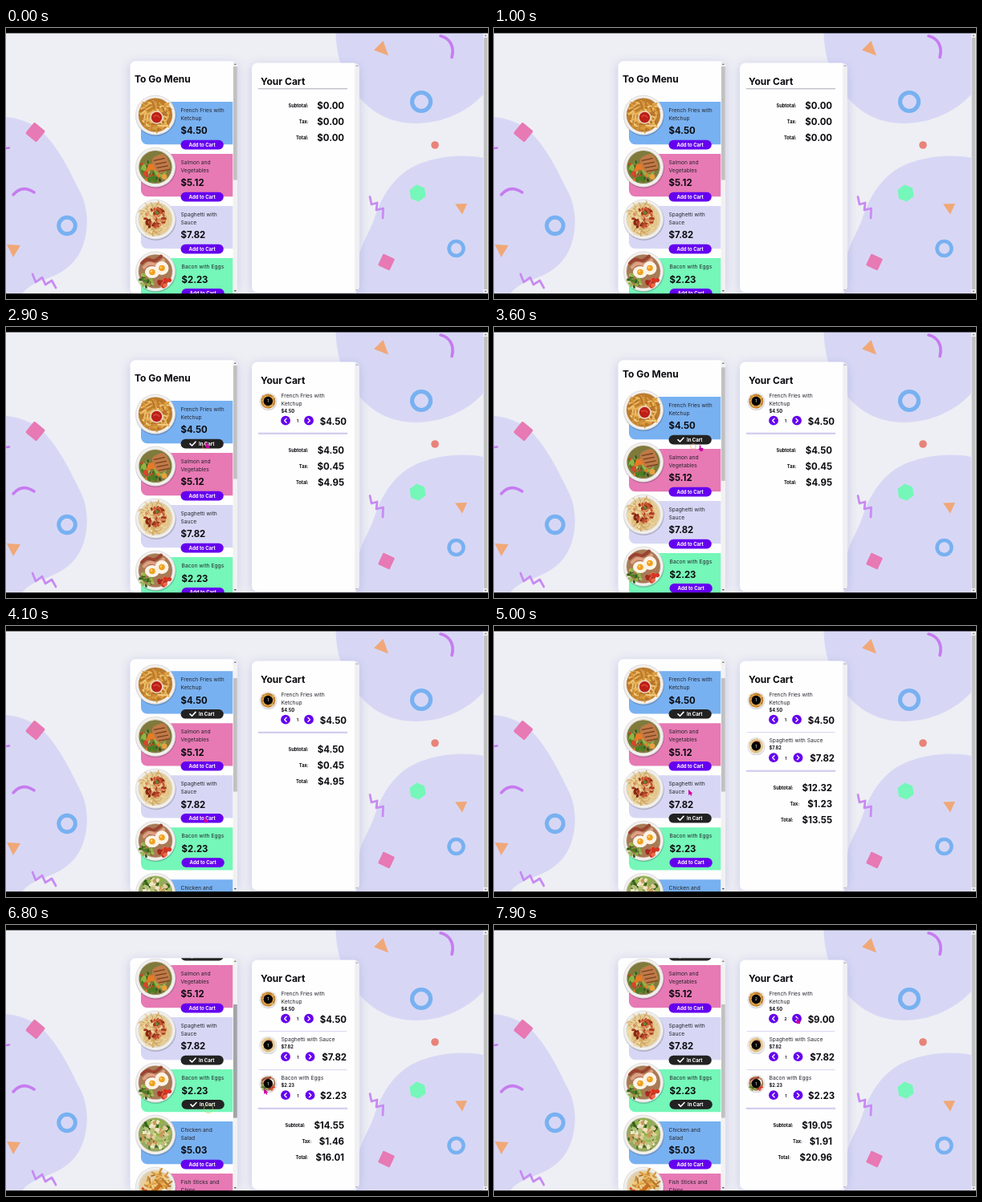
An HTML page for the animation above (8000 ms loop, 600 px wide and 338 px high).

```html
<!DOCTYPE html>
<html lang="en">
<head>
<meta charset="utf-8">
<title>To Go Menu</title>
<style>
html, body { margin: 0; width: 100%; height: 100%; overflow: hidden; background: #000; }
svg { display: block; width: 600px; height: 338px; font-family: Inter, "Open Sans", sans-serif; }
</style>
</head>
<body>
<svg id="stage" viewBox="0 0 600 338" xmlns="http://www.w3.org/2000/svg"></svg>
<script>
const LOOP = 8000;
const BLUE = '#78b1f1', PINK = '#e779b4', LILAC = '#d7d7f5', GREEN = '#74f7b8';
const VIOLET = '#c77bf0', ORANGE = '#f0a878', BUTTON = '#6500ef', INK = '#0b0b0f';

const dishes = [
  { id: 'fries', lines: ['French Fries with', 'Ketchup'], cents: 450, fill: BLUE },
  { id: 'salmon', lines: ['Salmon and', 'Vegetables'], cents: 512, fill: PINK },
  { id: 'pasta', lines: ['Spaghetti with', 'Sauce'], cents: 782, fill: LILAC },
  { id: 'bacon', lines: ['Bacon with Eggs'], cents: 223, fill: GREEN },
  { id: 'salad', lines: ['Chicken and', 'Salad'], cents: 503, fill: BLUE },
  { id: 'fish', lines: ['Fish Sticks and', 'Chips'], cents: 634, fill: PINK }
];

// [time, dish]: each click adds one piece
const orders = [[2700, 0], [4400, 2], [6200, 3], [7800, 0]];
const scrolls = [[3540, 0], [3800, 35.8], [5050, 35.8], [5600, 107]];
const pointer = [
  [0, 300, 345], [1000, 300, 345], [1850, 249, 150], [2500, 248, 144], [3300, 248, 144],
  [3600, 255, 147.5], [4100, 246, 238], [4600, 246, 238], [5000, 242, 204], [5500, 242, 207],
  [5900, 251, 229], [6100, 250, 225], [6300, 250, 225], [6800, 321, 204], [7000, 326, 200],
  [7600, 376, 116], [8000, 376, 116]
];
const rings = [
  [2700, 3700, 248, 149, 3.3, '#e8a070'],
  [4400, 4800, 247, 241, 5.5, '#d8c060'],
  [6200, 7000, 252, 229, 5.5, '#b8d060']
];

const money = c => '$' + (c / 100).toFixed(2);
const text = (x, mid, s, size, weight = 400, anchor = 'start', fill = INK) =>
  `<text x="${x}" y="${mid + size * 0.36}" font-size="${size}" font-weight="${weight}" text-anchor="${anchor}" fill="${fill}">${s}</text>`;
const circle = (x, y, r, fill, extra = '') => `<circle cx="${x}" cy="${y}" r="${r}" fill="${fill}" ${extra}/>`;
const ring = (x, y, r, w, color) => circle(x, y, r, 'none', `stroke="${color}" stroke-width="${w}"`);
const path = (d, fill) => `<path d="${d}" fill="${fill}"/>`;
const line = (d, color, w) =>
  `<path d="${d}" fill="none" stroke="${color}" stroke-width="${w}" stroke-linecap="round" stroke-linejoin="round"/>`;
const box = (x, y, w, h, r, fill, extra = '') =>
  `<rect x="${x}" y="${y}" width="${w}" height="${h}" rx="${r}" fill="${fill}" ${extra}/>`;
const arrow = (x, y, dir, color) => path(`M${x - 1.6},${y + dir}h3.2L${x},${y - dir}z`, color);

function random(seed) {
  return () => (seed = seed * 16807 % 2147483647) / 2147483647;
}

// n pieces spread over a disc, each one turned at random
function scatter(seed, n, cx, cy, reach, colors, piece) {
  const rnd = random(seed);
  let out = '';
  for (let i = 0; i < n; i++) {
    const a = rnd() * 6.283, d = Math.sqrt(rnd()) * reach;
    const x = cx + d * Math.cos(a), y = cy + d * Math.sin(a);
    out += `<g transform="translate(${x.toFixed(1)} ${y.toFixed(1)}) rotate(${Math.round(rnd() * 360)})">` +
      piece(colors[i % colors.length]) + '</g>';
  }
  return out;
}
const stick = c => box(-7, -1, 14, 2, 0.7, c);
const cube = c => box(-2.6, -2, 5.2, 4, 1, c);
const leaf = c => `<ellipse rx="4" ry="2.4" fill="${c}"/>`;
const crumb = c => `<ellipse rx="2.3" ry="1.5" fill="${c}"/>`;
const noodle = c => line('M-7,0Q-2,-6 3,-1T8,1', c, 1.1);

const fryTones = ['#c98a35', '#e8b35a', '#d99a3c', '#f2cc80', '#b87428'];
const greens = ['#4d7d24', '#8fb544', '#355f1c', '#a9bf5e'];
const food = {
  fries: circle(0, 0, 21, '#bd7c2c') + scatter(7, 80, 0, 0, 17, fryTones, stick) +
    circle(1.5, 3, 8.3, '#ead9c2') + circle(1.5, 3, 6.7, '#bd2019') + line('M-2,2Q2,-1 5,3', '#e0523f', 1.2),
  salmon: circle(0, 0, 20.5, '#7f7a3c') +
    scatter(11, 60, -3, 3, 16, [...greens, '#e87a25', '#d63c21', '#3d4a1c'], crumb) +
    scatter(13, 14, -8, 6, 10, ['#4d7d24', '#e87a25', '#8fb544'], leaf) +
    '<g transform="rotate(-24 8 -6)">' + box(-3, -16, 19, 22, 6, '#c07a48') +
    [-12, -7, -2, 3].map(y => line(`M0,${y}l13,3`, '#75401f', 1.3)).join('') + '</g>' +
    circle(11, 12, 3.5, '#e8a040') + circle(-12, 8, 3, '#d8452c'),
  pasta: circle(0, 0, 20.5, '#e3cc98') + scatter(5, 75, 0, 0, 16.5, ['#e2c283', '#f2dca8', '#cfa460'], noodle) +
    scatter(19, 60, 0, -1, 13, ['#a83920', '#c95630', '#842612', '#d98a58'], crumb) + circle(2, -8, 2, '#5c8d2f'),
  bacon: circle(0, 0, 21, '#a87a55') +
    [-17, -12, -7].map((y, i) => line(`M${-17 + i * 3},${y + 7}q6,-7 11,-4t13,-5`, i % 2 ? '#e0a084' : '#9c4330', 4)).join('') +
    scatter(23, 28, -11, 11, 9, greens, crumb) + scatter(31, 12, 11, 12, 7, ['#d73522', '#ec6b4a', '#a82a1c'], c => circle(0, 0, 2.6, c)) +
    '<ellipse cx="-4" cy="1" rx="9" ry="7.5" fill="#fbf3e6"/><ellipse cx="8" cy="-4" rx="8.5" ry="8.5" fill="#fbf3e6"/>' +
    circle(-4, 1, 3.8, '#f0a020') + circle(8, -4, 3.8, '#f0a020') + circle(-5, 0, 1.2, '#ffd676') + circle(7, -5, 1.2, '#ffd676'),
  salad: circle(0, 0, 21, '#98a862') + scatter(41, 55, 0, 0, 18, greens, leaf) +
    scatter(43, 55, 0, 0, 17, ['#e0cc9a', '#f0e5c6', '#c8995a', '#b5c27a'], cube),
  fish: circle(0, 0, 20, '#e4cfa4') + scatter(47, 45, 2, -5, 14, fryTones, stick) +
    scatter(53, 9, -3, 9, 9, ['#c76d1f', '#e19337'], c => box(-7, -2.3, 14, 4.6, 1.5, c)) +
    scatter(59, 8, -12, 6, 5, ['#d64a2a', '#5c8d2f'], crumb) + circle(11, 8, 5.5, '#f6f1ea')
};

const plates = dishes.map(d => `<g id="${d.id}">` +
  circle(0.5, 1.2, 25.3, '#30304a', 'opacity=".25"') + circle(0, 0, 25, '#e3e1df') +
  circle(0, 0, 23.8, '#f4f2ef') + circle(0, 0, 21.8, '#e4e0da') + food[d.id] + '</g>').join('');

const backdrop = box(0, 0, 600, 338, 0, '#eeeff4') +
  path('M410.5,6C411,48 430,85 462,106C503,131 562,118 594,83V6z', LILAC) +
  path('M594,162C565,156 522,161 497,179C475,196 466,216 459,236C452,258 438,272 436,305V332H594z', LILAC) +
  path('M0,111C22,113 40,122 53,138C70,158 82,184 94,208C103,228 103,255 94,276C86,294 72,305 50,313C35,318 24,325 20,332H0z', LILAC) +
  box(-9, -9, 18, 18, 2, PINK, 'transform="translate(36.5 130) rotate(39)"') +
  box(-8, -8, 16, 16, 1.5, PINK, 'transform="translate(473.5 292) rotate(25)"') +
  line('M9,208Q20,195 35,205', VIOLET, 3.5) + line('M0,150L4,149.5', VIOLET, 2.5) +
  line('M541,10C551,12 559,22 555,36.5', VIOLET, 3.7) +
  line('M33,307L37,317L45,311L49,320L57,315L62,324', '#c78bf2', 2.8) +
  line('M453,210.5L455,220L462,218L461,227L469.5,225L469,237', '#c78bf2', 2.8) +
  ring(76, 246.5, 10.3, 5, BLUE) + ring(517, 92, 11.5, 5.2, BLUE) + ring(560.5, 275, 9, 4.6, BLUE) +
  path('M1,270L18,271L9,286z', ORANGE) + path('M469.5,16L458,27.5L476,34.5z', ORANGE) +
  path('M559,219.5L574,219L568,232.5z', ORANGE) + circle(534, 146, 4.8, '#e8837b') +
  path('M511,195.5L521,199.5L522.5,210L514,216.5L504,213L502.5,202z', GREEN) +
  box(594, 6, 6, 326, 0, '#f1f1f3') + box(594.7, 12, 4.6, 314, 0, '#c1c1c1') +
  arrow(597, 9.3, 1, '#888') + arrow(597, 328.8, -1, '#777');

function menuRow(d, i) {
  const y = 92 + i * 65, short = d.lines.length === 1;
  const x = short ? 218.5 : 217.5, shift = short ? -9.7 : 0, by = y + 53.6 + shift;
  const pill = fill => box(x, by - 5.8, 53.3, 11.6, 5.8, fill);
  return box(168, y, 130, 53.3, 8, d.fill) +
    `<use href="#${d.id}" x="186" y="${y + 16.5}"/>` +
    d.lines.map((s, n) => text(x, y + 10.3 + n * 9.9, s, 6.7, 400, 'start', '#25252c')).join('') +
    text(x, y + 36.3 + shift, money(d.cents), 11.4, 700) +
    `<g class="add">${pill(BUTTON)}${text(x + 26.7, by, 'Add to Cart', 6, 700, 'middle', '#fff')}</g>` +
    `<g class="added">${pill('#222')}${line(`M${x + 11.5},${by}l2.5,2.4l4.5,-4.8`, '#fff', 1.6)}` +
    text(x + 22.5, by, 'In Cart', 6, 700, 'start', '#fff') + '</g>';
}

const stage = document.getElementById('stage');
stage.innerHTML = `<defs>
  <clipPath id="left"><rect x="154.5" y="41.3" width="133.5" height="291" rx="7"/></clipPath>
  <clipPath id="list"><rect x="154" y="41" width="128.5" height="291"/></clipPath>
  <clipPath id="right"><rect x="306" y="43.5" width="133.5" height="286.5" rx="7"/></clipPath>
  <filter id="soft" x="-30%" y="-20%" width="160%" height="140%"><feGaussianBlur stdDeviation="6"/></filter>
  ${plates}</defs>
  ${backdrop}
  ${box(152, 42, 138, 290, 9, '#a9a9dc', 'opacity=".42" filter="url(#soft)"')}
  ${box(304, 44, 138, 288, 9, '#a9a9dc', 'opacity=".42" filter="url(#soft)"')}
  <g clip-path="url(#left)">
    ${box(154, 41, 135, 291, 0, '#fefeff')}
    <g clip-path="url(#list)"><g id="menu">${text(160, 64, 'To Go Menu', 12, 700)}${dishes.map(menuRow).join('')}</g></g>
    ${box(282.5, 41, 6, 291, 0, '#f1f1f1')}
    ${arrow(285.3, 45, 0.9, '#777')}${arrow(285.3, 328, -0.9, '#555')}
    <rect id="thumb" x="283" width="4.8" height="141.5"/>
  </g>
  <g clip-path="url(#right)">
    ${box(306, 43, 134, 288, 0, '#fefeff')}
    ${box(434, 43, 6, 288, 0, '#f0f0f3')}
    ${arrow(436.8, 47, 0.9, '#aaa')}${arrow(436.8, 327, -0.9, '#aaa')}
    ${text(317, 66.7, 'Your Cart', 12, 700)}
    <g id="cart"></g>
  </g>
  <g id="clicks"></g>
  <g id="cursor">${path('M0,0L0.3,7.2L1.9,5.6L3.1,7.7L4.4,7L3.4,5H5.5z', '#c800a0')}</g>
  <g id="hand">${path('M1.3,0Q2.3,-.2 2.4,1V2.9L5,3.6Q5.8,4 5.4,5L4.7,7.3H1.8L-.4,4.7Q-.2,3.7 .7,4V.8Q.7,.1 1.3,0z', '#c800a0')}</g>
  ${box(0, 0, 600, 6.5, 0, '#000')}${box(0, 331.2, 600, 7, 0, '#000')}`;

const el = id => document.getElementById(id);
const menu = el('menu'), thumb = el('thumb'), cart = el('cart'), clicks = el('clicks');
const cursor = el('cursor'), hand = el('hand');
const addPills = stage.querySelectorAll('.add'), addedPills = stage.querySelectorAll('.added');

function track(keys, t) {
  if (t <= keys[0][0]) return keys[0].slice(1);
  const i = keys.findIndex(k => k[0] > t);
  if (i < 0) return keys[keys.length - 1].slice(1);
  const a = keys[i - 1], b = keys[i], p = (t - a[0]) / (b[0] - a[0]), e = p * p * (3 - 2 * p);
  return a.slice(1).map((v, n) => v + (b[n + 1] - v) * e);
}

function stepper(x, y, dir) {
  return circle(x, y, 5.9, BUTTON) + line(`M${x - dir * 1.1},${y - 2.5}l${dir * 2.5},2.5l${-dir * 2.5},2.5`, '#fff', 1.3);
}

function cartItem(d, n, top) {
  const long = d.id === 'fries';
  const names = long ? d.lines : [d.lines.join(' ')];
  const y = top + (long ? 9.7 : 0), mid = y + 31.5;
  return `<use href="#${d.id}" transform="translate(326.3 ${top + 17}) scale(.43)"/>` +
    circle(326.3, top + 17, 5.7, '#050505') + text(326.3, top + 17, n, 5, 400, 'middle', '#fff') +
    names.map((s, i) => text(342.5, top + 10.3 + i * 9.7, s, 6.7, 400, 'start', '#25252c')).join('') +
    text(342.5, y + 19.7, money(d.cents), 5.7, 700) +
    stepper(348, mid, -1) + stepper(long ? 377 : 378.5, mid, 1) +
    text(long ? 363 : 363.5, mid + 0.8, n, 5.4, 600, 'middle') +
    text(424, mid + 0.8, money(d.cents * n), 11.4, 700, 'end');
}

function drawCart(list) {
  let y = 75.5, sum = 0, out = '';
  list.forEach(([i, n], k) => {
    out += cartItem(dishes[i], n, y);
    sum += dishes[i].cents * n;
    y += i === 0 ? 57.2 : 48;
    if (k < list.length - 1) out += box(315, y - 0.7, 109.5, 1.2, 0, '#dcdaf0');
  });
  out += list.length ? box(314, y - 1, 111, 2.2, 0, '#d2cbef') : box(314, y - 0.2, 111, 1, 0, '#aaa8b4');
  const tax = Math.round(sum / 10);
  [['Subtotal:', sum], ['Tax:', tax], ['Total:', sum + tax]].forEach(([label, c], k) => {
    const s = money(c), mid = y + 21 + k * 20;
    const ones = s.split('1').length - 1;
    const width = 10 + 7.6 * (s.length - 2) - 3.6 * ones;
    out += text(421 - width - 11.5, mid + 0.3, label, 5.7, 700, 'end') + text(421, mid, s, 11.4, 700, 'end');
  });
  cart.innerHTML = out;
}

let shown = null;
function render(t) {
  const count = new Map();
  orders.forEach(([at, i]) => { if (t >= at) count.set(i, (count.get(i) || 0) + 1); });
  const list = [...count], key = list.join('|');
  if (key !== shown) {
    shown = key;
    drawCart(list);
    dishes.forEach((d, i) => {
      addPills[i].style.display = count.has(i) ? 'none' : '';
      addedPills[i].style.display = count.has(i) ? '' : 'none';
    });
  }
  const [scroll] = track(scrolls, t);
  menu.setAttribute('transform', `translate(0 ${-scroll})`);
  thumb.setAttribute('y', 48 + scroll * 0.477);
  // the bar stays dark for a moment after the pointer crosses it
  thumb.setAttribute('fill', t > 6550 && t < 6900 ? '#a4a4a6' : '#c1c1c1');
  const [x, y] = track(pointer, t);
  const overButton = (t > 1800 && t < 3650) || (t > 4000 && t < 4750) || (t > 5850 && t < 6400) || t > 7500;
  cursor.style.display = overButton ? 'none' : '';
  hand.style.display = overButton ? '' : 'none';
  (overButton ? hand : cursor).setAttribute('transform', `translate(${x} ${y})`);
  clicks.innerHTML = rings.filter(r => t >= r[0] && t < r[1])
    .map(r => ring(r[2], r[3], r[4], 0.7, r[5])).join('');
}

function tick() {
  render(performance.now() % LOOP);
  requestAnimationFrame(tick);
}
tick();
</script>
</body>
</html>
```
